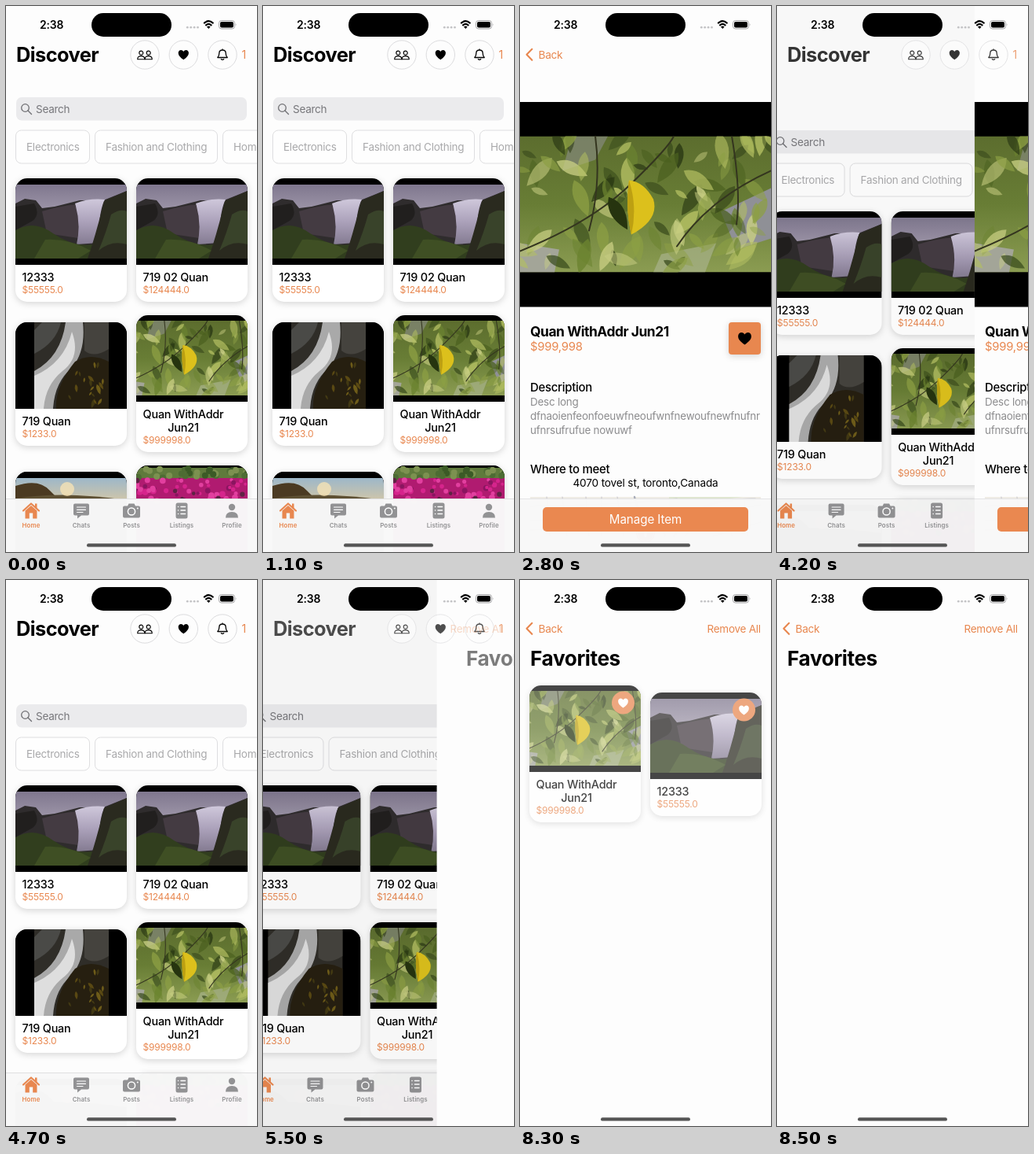
An HTML page for the animation above (8900 ms loop, 320x694 px).

```html
<!DOCTYPE html>
<html lang="en">
<head>
<meta charset="utf-8">
<title>Marketplace</title>
<style>
html, body { margin: 0; width: 100%; height: 100%; overflow: hidden; background: #fdfdfd; }
svg { display: block; }
#stage { width: 100vw; height: 100vh; font-family: Inter, "Liberation Sans", sans-serif; }
.lift { filter: drop-shadow(0 2px 4px rgba(0,0,0,.16)); }
</style>
</head>
<body>
<svg id="stage" viewBox="0 0 320 694"></svg>
<script>
const LOOP = 8900, W = 320, DROP = 42;
const ORANGE = '#e8874f', GREY = '#929294', PAPER = '#fdfdfd';

let seed = 7;
const rnd = (a = 0, b = 1) => {
  seed = (seed * 16807) % 2147483647;
  return a + (b - a) * seed / 2147483647;
};
const pick = list => list[Math.floor(rnd(0, list.length))];
const many = (n, make) => Array.from({ length: n }, (_, i) => make(i)).join('');

const rect = (x, y, w, h, fill, r = 0, more = '') =>
  `<rect x="${x}" y="${y}" width="${w}" height="${h}" rx="${r}" fill="${fill}" ${more}/>`;
const path = (d, fill, more = '') => `<path d="${d}" fill="${fill}" ${more}/>`;
const line = (d, stroke, w = 1.2, more = '') =>
  path(d, 'none', `stroke="${stroke}" stroke-width="${w}" stroke-linecap="round" stroke-linejoin="round" ${more}`);
const disc = (x, y, r, fill, more = '') => `<circle cx="${x}" cy="${y}" r="${r}" fill="${fill}" ${more}/>`;
const text = (x, y, s, size, fill = '#000', weight = 400, gap = -.25, anchor = 'start') =>
  `<text x="${x}" y="${y}" font-size="${size}" fill="${fill}" font-weight="${weight}" letter-spacing="${gap}" text-anchor="${anchor}">${s}</text>`;
const group = (id, body) => `<g id="${id}">${body}</g>`;
const at = (x, y, body, k = 1) => `<g transform="translate(${x} ${y}) scale(${k})">${body}</g>`;
const heart = (x, y, fill, k = 1) => at(x, y,
  path('M0 7.6C-5 4-8 1.2-8-2.7C-8-5.4-6-7.2-3.9-7.2C-2.2-7.2-.8-6.2 0-4.8C.8-6.2 2.2-7.2 3.9-7.2C6-7.2 8-5.4 8-2.7C8 1.2 5 4 0 7.6Z', fill), k);
const photo = (id, x, y, w, h) => `<use href="#${id}" x="${x}" y="${y}" width="${w}" height="${h}"/>`;
const symbol = (id, w, h, body) =>
  `<symbol id="${id}" viewBox="0 0 ${w} ${h}" preserveAspectRatio="xMidYMid slice">${body}</symbol>`;
const fade = (id, ...stops) => `<linearGradient id="${id}" x2="0" y2="1">` +
  stops.map((c, i) => `<stop offset="${i / (stops.length - 1)}" stop-color="${c}"/>`).join('') + '</linearGradient>';

// Pictures
const leaf = (x, y, l, turn, fill, alpha) =>
  path(`M${-l} 0Q${-l * .2} ${-l * .75} ${l} 0Q${-l * .2} ${l * .7} ${-l} 0Z`, fill,
    `opacity="${alpha}" transform="translate(${x.toFixed(1)} ${y.toFixed(1)}) rotate(${turn.toFixed(0)})"`);

const leaves = () => symbol('leaves', 320, 173,
  rect(0, 0, 320, 173, 'url(#foliage)') +
  path('M0 136L50 144L44 173L0 173Z', '#a3a598') +
  path('M256 96L320 66L320 130L276 144Z', '#8f9096') +
  path('M66 0L112 0L96 30L54 44Z', '#85897c', 'opacity=".7"') +
  path('M180 150L250 136L236 173L170 173Z', '#a8b38a', 'opacity=".7"') +
  many(95, () => leaf(rnd(0, 320), rnd(0, 173), rnd(9, 25), rnd(10, 150),
    pick(['#2b3a14', '#35481a', '#4b601f', '#6c8430', '#8da044', '#b3bf62', '#c9cf83']), rnd(.45, .85).toFixed(2))) +
  line('M0 146Q90 110 140 62T196 0M96 0Q104 60 88 120M270 0Q282 70 276 112M320 44Q240 80 200 140', '#34351f', 2) +
  leaf(125, 98, 24, 60, '#26340f', 1) +
  path('M139 56Q158 58 170 80Q178 106 142 125Q134 92 139 56Z', '#dcc01c') +
  path('M139 56Q150 90 142 125Q134 92 139 56Z', '#bda012'));

const falls = () => symbol('falls', 142, 94,
  rect(0, 0, 142, 94, 'url(#dusk)') +
  path('M0 24L12 18L26 20L34 30L50 28L82 20L112 20L142 8L142 94L0 94Z', '#2f2c2d') +
  path('M34 34Q60 26 82 25L80 68L40 62Z', '#443b42') +
  path('M76 24Q94 17 114 19Q106 34 106 74L78 76Q84 50 76 24Z', 'url(#water)') +
  path('M0 58Q24 44 48 62Q74 80 100 76L142 94L0 94Z', '#313e1e') +
  path('M0 28L24 24Q32 38 22 46L0 58Z', '#211f1e') +
  path('M113 21L142 8L142 94L92 94Q102 66 113 21Z', '#2a2a1f') +
  path('M122 38Q134 30 142 34L142 76Q122 70 106 84Q116 60 122 38Z', '#39432a') +
  path('M38 70Q68 68 96 84L80 94L24 94Z', '#435426', 'opacity=".8"'));

const stream = () => symbol('stream', 142, 110,
  rect(0, 0, 142, 110, '#000') + rect(24, 0, 95, 110, '#2f2d28') +
  path('M64 0L86 0Q90 36 72 58Q50 76 48 110L24 110L24 62Q58 44 64 0Z', '#a9a9a9') +
  path('M24 68Q62 52 72 12Q84 44 60 62Q38 80 36 110L24 110Z', '#dedede') +
  path('M34 0L58 0Q52 26 24 40L24 10Z', '#4a4a47') +
  path('M88 0L119 0L119 34Q100 46 88 36Z', '#45433e') +
  path('M76 50Q96 38 119 50L119 110L52 110Q50 82 76 50Z', '#261f10') +
  many(18, () => leaf(rnd(68, 112), rnd(50, 104), rnd(3, 7), rnd(40, 140), pick(['#6b5714', '#4b4214', '#86701c']), .75)));

const peaks = () => symbol('peaks', 142, 110,
  rect(0, 0, 142, 110, '#000') + rect(0, 8, 142, 94, 'url(#dawn)') +
  path('M0 18Q30 8 44 24L62 42L0 42Z', '#4b3a22') + path('M0 34Q60 24 142 36L142 102L0 102Z', '#5e5033') +
  disc(66, 22, 9, '#ffe9b5', 'opacity=".7"'));

const blossom = () => symbol('blossom', 142, 110,
  rect(0, 0, 142, 110, '#000') + rect(0, 3, 142, 15, '#5f7a3c') + rect(0, 16, 142, 94, '#b01b70') +
  many(30, () => disc(rnd(0, 142).toFixed(1), rnd(4, 16).toFixed(1), 4, pick(['#3b5a26', '#7c9150', '#4d6c33']))) +
  many(60, () => disc(rnd(0, 142).toFixed(1), rnd(18, 46).toFixed(1), rnd(2, 4).toFixed(1), pick(['#d6248c', '#8a1560', '#e23f9f', '#5e2344']))));

const defs = `<defs>${fade('foliage', '#5c6d2e', '#687d35', '#8b9c52')}${fade('dusk', '#7f778e', '#aaa2b3', '#8a8298')}
${fade('water', '#cfc8db', '#aba1ba', '#847b91')}${fade('dawn', '#9db7c9', '#f1cf94', '#8b6b3c')}
<clipPath id="round"><rect width="142" height="200" rx="15"/></clipPath>
${leaves()}${falls()}${stream()}${peaks()}${blossom()}</defs>`;

// Cards
const PICS = { // top and height of the picture inside the black frame
  falls: [8, 94], leaves: [7, 95], stream: [0, 110], peaks: [0, 110], blossom: [0, 110]
};
function card(x, y, pic, title, price, liked) {
  const two = title.length > 1, [top, h] = PICS[pic], low = two ? 17 : 0;
  const names = two
    ? title.map((s, i) => text(60, 131 + 17 * i, s, 14.4, '#000', 500, -.2, 'middle')).join('')
    : text(8.5, 131, title[0], 14.4, '#000', 500, -.2);
  return at(x, y, rect(0, 0, 142, 157 + low, '#fff', 15, 'class="lift"') +
    `<g clip-path="url(#round)">${rect(0, 0, 142, 110, '#000')}${photo(pic, 0, top, 142, h)}</g>` +
    names + text(8.5, 146 + low, price, 12, ORANGE, 400, -.2) +
    (liked ? disc(119.5, 22, 14.5, ORANGE) + heart(119.5, 22.3, '#fff', .8) : ''));
}
const LONG = ['Quan WithAddr', 'Jun21'];

// Home screen
const chip = (x, w, s) => rect(x, 158, w, 42, '#fefefe', 7, 'stroke="#dedee0"') + text(x + 13.5, 184, s, 13.5, '#a9a9ab');
const search = rect(13, 116, 294, 29.5, '#ebebed', 7) +
  disc(24.5, 129.5, 4.8, 'none', 'stroke="#707074" stroke-width="1.3"') + line('M28 133L32.5 137.5', '#707074', 1.4) +
  text(38, 136, 'Search', 13.6, '#77777b', 400, -.3);
const feed = search + chip(12.5, 94, 'Electronics') + chip(113.5, 156, 'Fashion and Clothing') + chip(276.5, 130, 'Home and Garden') +
  card(12, 219, 'falls', ['12333'], '$55555.0') + card(166, 219, 'falls', ['719 02 Quan'], '$124444.0') +
  card(12, 402, 'stream', ['719 Quan'], '$1233.0') + card(166, 393, 'leaves', LONG, '$999998.0') +
  card(12, 592, 'peaks', ['719'], '$120.0') + card(166, 584, 'blossom', ['719'], '$80.0');

const ICONS = [
  ['Home', line('M-10 0L0-9L10 0', ORANGE, 2.2) + path('M-7.5 0L0-6.5L7.5 0V10H2.2V3H-2.2V10H-7.5Z', ORANGE) + rect(5, -9, 2.5, 6, ORANGE)],
  ['Chats', path('M-8-9H8Q10-9 10-7V4Q10 6 8 6H0L-5 10V6H-8Q-10 6-10 4V-7Q-10-9-8-9Z', GREY) +
    line('M-5.5-4.5H5.5M-5.5-1.2H5.5M-5.5 2H2', '#fff', 1.2)],
  ['Posts', path('M-9-6H-5L-3.5-9H3.5L5-6H9Q11-6 11-4V7Q11 9 9 9H-9Q-11 9-11 7V-4Q-11-6-9-6Z', GREY) +
    disc(0, 1, 4.6, 'none', 'stroke="#fff" stroke-width="1.5"') + disc(7.8, -3, 1, '#fff')],
  ['Listings', rect(-7.5, -10, 15, 20, GREY, 2.5) + line('M-1-5H4.5M-1-.5H4.5M-1 4H4.5M-4.5-5H-4.4M-4.5-.5H-4.4M-4.5 4H-4.4', '#fff', 1.5)],
  ['Profile', disc(0, -4.5, 4.2, GREY) + path('M-8 9Q-8 1.5 0 1.5T8 9Z', GREY)]
];
const tabs = rect(0, 626, W, 68, '#f8f8f8', 0, 'opacity=".985"') + rect(0, 626, W, .7, '#d4d4d6') +
  ICONS.map(([name, art], i) => at(32 + 64 * i, 641.5, art) +
    text(32 + 64 * i, 663, name, 7.9, i ? GREY : ORANGE, 600, .1, 'middle')).join('');

const person = (x, y, k) => at(x, y, disc(0, -3, 2.6, 'none', 'stroke="#000" stroke-width="1.2"') +
  line('M-4.8 5.5Q-4.8 1.2 0 1.2T4.8 5.5Z', '#000', 1.2), k);
const ring = x => disc(x, 62, 18.2, '#fdfdfd', 'stroke="#dcdcde"');
const homeHead = text(13, 71, 'Discover', 25.4, '#000', 700, -.6) +
  ring(177) + person(172.3, 62.5, .95) + person(181.7, 62.5, .95) +
  ring(226.3) + heart(226.3, 62, '#000', .83) +
  ring(276) + line('M269.8 65.5Q271.8 63.5 271.8 60Q271.8 56 276 56T280.2 60Q280.2 63.5 282.2 65.5ZM276 56V55M274.3 67.6Q276 69 277.7 67.6', '#000', 1.3) +
  text(300.5, 67, '1', 14, ORANGE);

// Item screen
const map = rect(13, 582, 294, 90, '#efece5') +
  path('M190 582H285L250 586L205 612L190 606Z', '#dfe6d0') +
  line('M13 594L140 590L200 584M13 612L110 606L200 600M13 624L150 620M34 582L38 632M54 582L60 632M84 582L88 632M104 582V632M124 582L132 632' +
    'M236 606L307 592M246 632L307 614M262 594L270 632M286 586L290 632M210 632L240 600', '#c6c4cd', 1) +
  line('M146 582Q150 604 168 614T184 632M300 585Q246 584 226 600T196 632', '#a9adba', 2.4) +
  disc(160, 628, 12, '#d8404c') + disc(160, 628, 10.5, 'none', 'stroke="#f09a9c"') + rect(158.7, 623, 2.6, 10, '#fff', 1) + disc(160, 621, 1.6, '#fff');
const about = ['Desc long', 'dfnaoienfeonfoeuwfneoufwnfnewoufnewfnufnr', 'ufnrsufrufue nowuwf'];
const item = rect(0, 80, W, 260.5, '#000') + photo('leaves', 0, 123.5, 320, 173) +
  text(13, 378, 'Quan WithAddr Jun21', 17.4, '#000', 700, -.45) + text(13, 396, '$999,998', 14.8, ORANGE, 400, -.2) +
  rect(266, 360, 41, 41, '#fff', 4, 'class="lift"') + rect(266, 360, 41, 41, ORANGE, 4, 'id="liked"') + heart(286.5, 380.5, '#000', 1.05) +
  text(13, 447.5, 'Description', 14.9, '#000', 500, -.25) +
  about.map((s, i) => text(13, 465.5 + 18 * i, s, 13.4, '#8c8c8e', 400, -.2)).join('') +
  text(13, 551.5, 'Where to meet', 14.9, '#000', 500, -.25) +
  text(160, 569, '4070 tovel st, toronto,Canada', 13.6, '#000', 400, -.15, 'middle') + map;
const manage = rect(0, 626, W, 80, '#f8f8f8', 0, 'opacity=".985"') + rect(0, 626, W, .7, '#dcdcde') +
  rect(29, 637, 262, 31, '#ea8850', 5) + text(160, 658, 'Manage Item', 15.2, '#fff', 400, -.1, 'middle');

// Fixed parts
const back = line('M15.3 54.8L8.5 61.8L15.3 68.8', ORANGE, 2.1) + text(23.5, 66.7, 'Back', 13.7, ORANGE, 400, -.3);
const status = text(43, 29, '2:38', 14, '#000', 600, -.2) + rect(109, 9, 102, 30, '#000', 15) +
  many(4, i => disc(231.3 + 4.4 * i, 27.2, 1.4, '#c4c4c6')) +
  line('M252.8 21.6Q258.3 16.6 263.8 21.6M255 24.4Q258.3 21.4 261.6 24.4', '#000', 2.1) + path('M258.3 29L256 26.4Q258.3 24.7 260.6 26.4Z', '#000') +
  rect(271.5, 18.5, 20, 10.5, 'none', 3.2, 'stroke="#a5a5a7"') + rect(273, 20, 17, 7.5, '#000', 2) +
  path('M292.8 22Q294.3 23.7 292.8 25.5Z', '#a5a5a7') + rect(103, 683.2, 114, 4.4, '#555', 2.2);

document.getElementById('stage').innerHTML = defs + rect(0, 0, W, 694, PAPER) +
  group('home', rect(0, 0, 420, 694, PAPER) + group('feed', feed) + tabs) +
  rect(0, 0, W, 694, '#000', 0, 'id="dim"') +
  group('item', rect(0, 0, W, 694, PAPER) + group('itemBody', item) + group('bar', manage)) +
  group('favs', rect(0, 0, W, 694, PAPER) + group('saved',
    card(12, 134, 'leaves', LONG, '$999998.0', true) + card(166, 143, 'falls', ['12333'], '$55555.0', true))) +
  group('homeHead', homeHead) + group('back', back) +
  group('remove', text(238.5, 66.7, 'Remove All', 13.5, ORANGE, 400, -.25)) +
  group('favTitle', text(13, 108.8, 'Favorites', 26.2, '#000', 700, -.4)) + status;

// Motion
const el = id => document.getElementById(id);
const move = (id, x, y = 0) => el(id).setAttribute('transform', `translate(${x.toFixed(2)} ${y.toFixed(2)})`);
const show = (id, a) => el(id).setAttribute('opacity', a.toFixed(3));
const ramp = (t, a, b) => Math.min(1, Math.max(0, (t - a) / (b - a)));
const ease = u => u * u * (3 - 2 * u);
const spring = ms => {
  const u = Math.max(0, ms) * .013;
  return u > 9 ? 1 : 1 - (1 + u) * Math.exp(-u);
};
const OPEN = 1322, CLOSE = 3977, FAVS = 5415;

function draw(t) {
  const a = t < CLOSE ? spring(t - OPEN) : 1 - spring(t - CLOSE);
  const b = spring(t - FAVS);
  const p = Math.max(a, b), drop = DROP * ease(ramp(t, 1850, 2250));
  move('home', -.3 * W * p);
  move('feed', 0, t < 3000 ? 0 : DROP);
  show('dim', .1 * p);
  move('item', W * (1 - a));
  move('itemBody', 0, drop);
  move('bar', 0, 5 * (1 - drop / DROP));
  show('liked', ramp(t, 2640, 2790));
  move('favs', W * (1 - b));
  show('saved', ramp(t, 5780, 6000) * (1 - ease(ramp(t, 8200, 8490))));
  show('homeHead', 1 - p);
  show('back', ramp(p, .4, .9));
  show('remove', b);
  move('favTitle', W * 1.11 * (1 - b));
  show('favTitle', Math.min(1, b * 1.65));
}
function tick() {
  draw(performance.now() % LOOP);
  requestAnimationFrame(tick);
}
tick();
</script>
</body>
</html>
```
